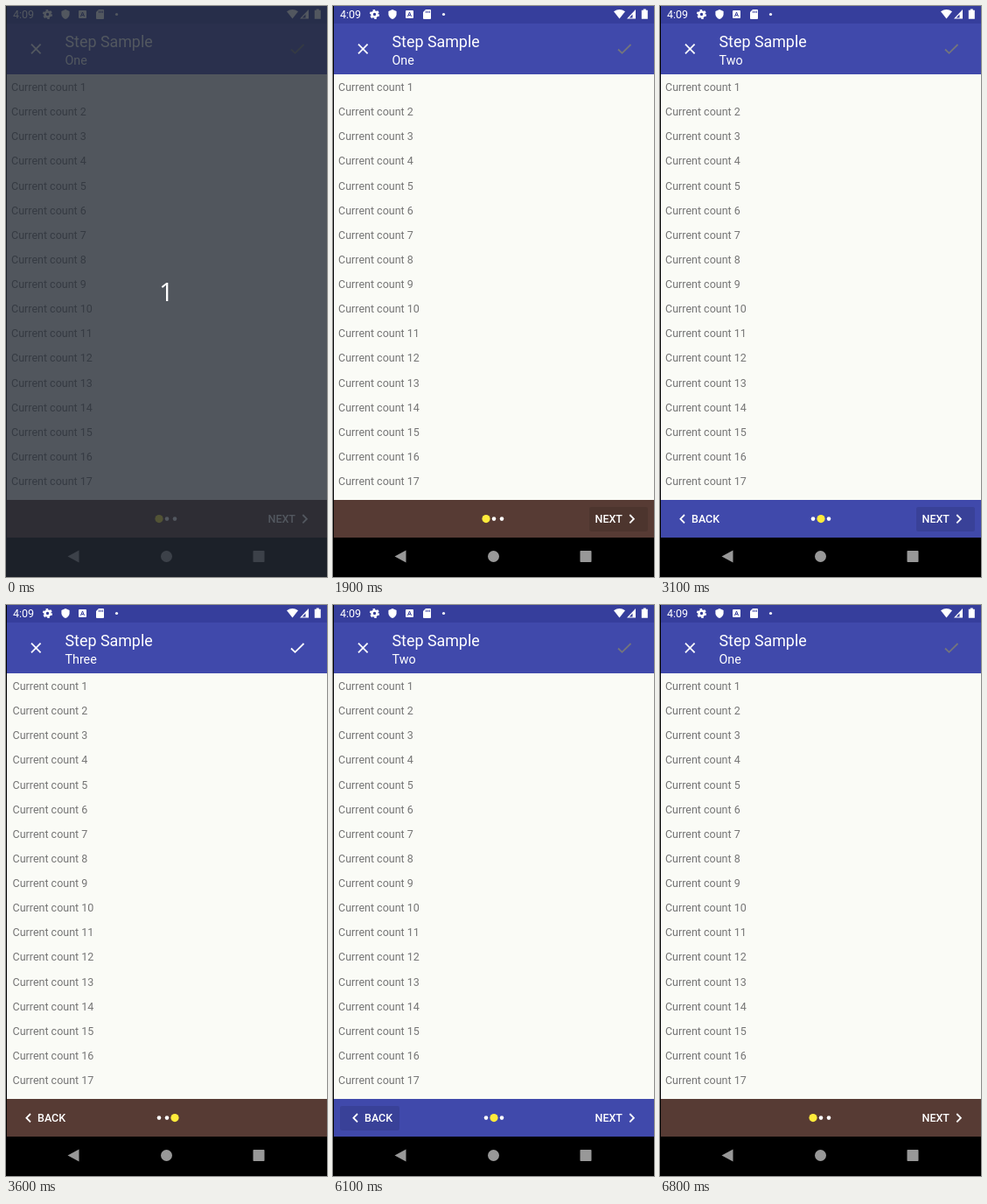
Recreate the animation shown at these times as an HTML page. Size 367 by 652 pixels, loop 9600 ms.

```html
<!DOCTYPE html>
<html lang="en">
<head>
<meta charset="utf-8">
<title>Step Sample</title>
<style>
  html, body { margin: 0; width: 100%; height: 100%; overflow: hidden; background: #000; }
  svg { display: block; width: 367px; height: 652px; font-family: Roboto, sans-serif; fill: #fff; }
  .line { fill: none; stroke: #fff; stroke-width: 1.8; }
  .label { font-size: 12.5px; font-weight: 500; }
  .page { font-size: 12.5px; fill: #757575; }
</style>
</head>
<body>
<svg viewBox="0 0 367 652">
  <defs><clipPath id="view"><path d="M0 78H367V564H0z"/></clipPath></defs>
  <rect width="367" height="652" fill="#000"/>

  <rect width="367" height="20" fill="#363e9c"/>
  <rect y="20" width="367" height="58" fill="#4049ab"/>
  <text x="8" y="14" font-size="12.5">4:09</text>
  <g id="status">
    <circle cx="47.5" cy="9.5" r="3" fill="none" stroke="#fff" stroke-width="2.6"/>
    <circle cx="47.5" cy="9.5" r="4.7" fill="none" stroke="#fff" stroke-width="1.8" stroke-dasharray="2.5 2.42"/>
    <path d="M68 4l4.6 2v3.2c0 2.700-2 4.900-4.600 5.800c-2.600-.9-4.600-3.100-4.600-5.800V6z"/>
    <rect x="83" y="5" width="9" height="9" rx="1"/>
    <path d="M85.500 12l2-5 2 5M86.300 10.500h2.400" fill="none" stroke="#363e9c"/>
    <path d="M106 4h5q1 0 1 1v9q0 1-1 1h-7q-1 0-1-1V7z"/>
    <path d="M106.500 5.500v2.500M108.500 5.500v2.500M110.400 5.500v2.500" stroke="#363e9c" stroke-width=".9"/>
    <circle cx="126.500" cy="9.500" r="1.600"/>
    <path d="M321 6.300q6.500-4.600 13 0L327.500 14.500z"/>
    <path d="M336 14.500L346 4v10.500z"/>
    <path d="M342.500 9.500V13.500H338.700z" fill="#363e9c"/>
    <path d="M354.800 3.500h3v1.200h2v10h-7v-10h2z"/>
  </g>
  <path class="line" d="M29 43.700l10.600 10.600M39.600 43.700L29 54.300"/>
  <text x="67.500" y="46.500" font-size="17.86">Step Sample</text>
  <text id="name" x="67.500" y="66.500" font-size="14.300">One</text>
  <path id="check" class="line" d="M326 49.500l4.500 4.300L340.500 44"/>

  <rect y="78" width="367" height="486" fill="#fafbf6"/>
  <g id="pages" clip-path="url(#view)"></g>

  <rect id="bar" y="564" width="367" height="43"/>
  <g id="back">
    <rect id="backPress" x="8" y="572" width="68" height="28" rx="2" fill="#000"/>
    <path class="line" d="M28 581l-4.600 4.700 4.600 4.700"/>
    <text class="label" x="36" y="590.300">BACK</text>
  </g>
  <g id="next">
    <rect id="nextPress" x="293" y="572" width="67" height="28" rx="2" fill="#000"/>
    <text class="label" x="299.500" y="590.300">NEXT</text>
    <path class="line" d="M339.300 581l4.600 4.700-4.600 4.700"/>
  </g>
  <g id="dots"></g>

  <g fill="#989898">
    <path d="M70.500 628.500L83.500 621.500V635.500z"/>
    <circle cx="183.500" cy="628.500" r="6.500"/>
    <rect x="282.500" y="622" width="13" height="13" rx=".8"/>
  </g>
  <rect width="1" height="652" fill="#000"/>

  <g id="intro">
    <rect width="367" height="652" fill="rgb(36,42,52)" opacity=".79"/>
    <text x="183.500" y="337" font-size="29.500" text-anchor="middle" font-family="Open Sans, Noto Sans, sans-serif">1</text>
  </g>
</svg>
<script>
const LOOP = 9600, TICK = 100, WIDTH = 367, SLIDE = 600, GROW = 400;
const steps = [
  { name: 'One', bar: '#573b34' },
  { name: 'Two', bar: '#4049ab' },
  { name: 'Three', bar: '#573b34' }
];
// Each move: start time, step left, step entered
const moves = [[2000, 0, 1], [3200, 1, 2], [4900, 2, 1], [6300, 1, 0]];
const presses = { next: [[1900, 2000], [3100, 3200]], back: [[6100, 6300]] };

const $ = id => document.getElementById(id);
const clamp = x => Math.min(1, Math.max(0, x));
const easeOut = x => 1 - (1 - x) ** 5;

function add(parent, tag, attrs, text = '') {
  const el = document.createElementNS('http://www.w3.org/2000/svg', tag);
  for (const key in attrs) el.setAttribute(key, attrs[key]);
  el.textContent = text;
  return parent.appendChild(el);
}

const pages = steps.map(() => {
  const page = add($('pages'), 'g', { class: 'page' });
  for (let i = 0; i < 17; i++)
    add(page, 'text', { x: 6, y: 97 + i * 28.13 }, `Current count ${i + 1}`);
  return page;
});
const dots = steps.map((_, i) => add($('dots'), 'circle', { cx: 175 + i * 9, cy: 585.6 }));

const pressLevel = (list, t) => Math.max(...list.map(([down, up]) =>
  t < down ? 0 : 1 - clamp((t - up) / 300)));

function draw(t) {
  const [start, from, to] = moves.filter(m => m[0] <= t).pop() || [-SLIDE, 0, 0];
  const scroll = from + (to - from) * easeOut(clamp((t - start) / SLIDE));
  const grow = clamp((t - start) / GROW);

  pages.forEach((page, i) =>
    page.setAttribute('transform', `translate(${(i - scroll) * WIDTH} 0)`));
  dots.forEach((dot, i) => {
    const size = (i === from ? 1 - grow : 0) + (i === to ? grow : 0);
    dot.setAttribute('r', 2.3 + 2.3 * size);
    dot.setAttribute('fill', i === to ? '#ffeb3b' : '#fff');
  });

  $('name').textContent = steps[to].name;
  $('bar').setAttribute('fill', steps[to].bar);
  $('check').style.stroke = to === 2 ? '#fff' : '#74757c';
  $('back').style.display = to > 0 ? '' : 'none';
  $('next').style.display = to < 2 ? '' : 'none';
  for (const id in presses)
    $(id + 'Press').setAttribute('opacity', 0.11 * pressLevel(presses[id], t));
  $('intro').style.display = t < 100 ? '' : 'none';
}

const origin = performance.now();
function frame() {
  const t = (performance.now() - origin) % LOOP;
  draw(Math.floor(t / TICK) * TICK);
  requestAnimationFrame(frame);
}
frame();
</script>
</body>
</html>
```
